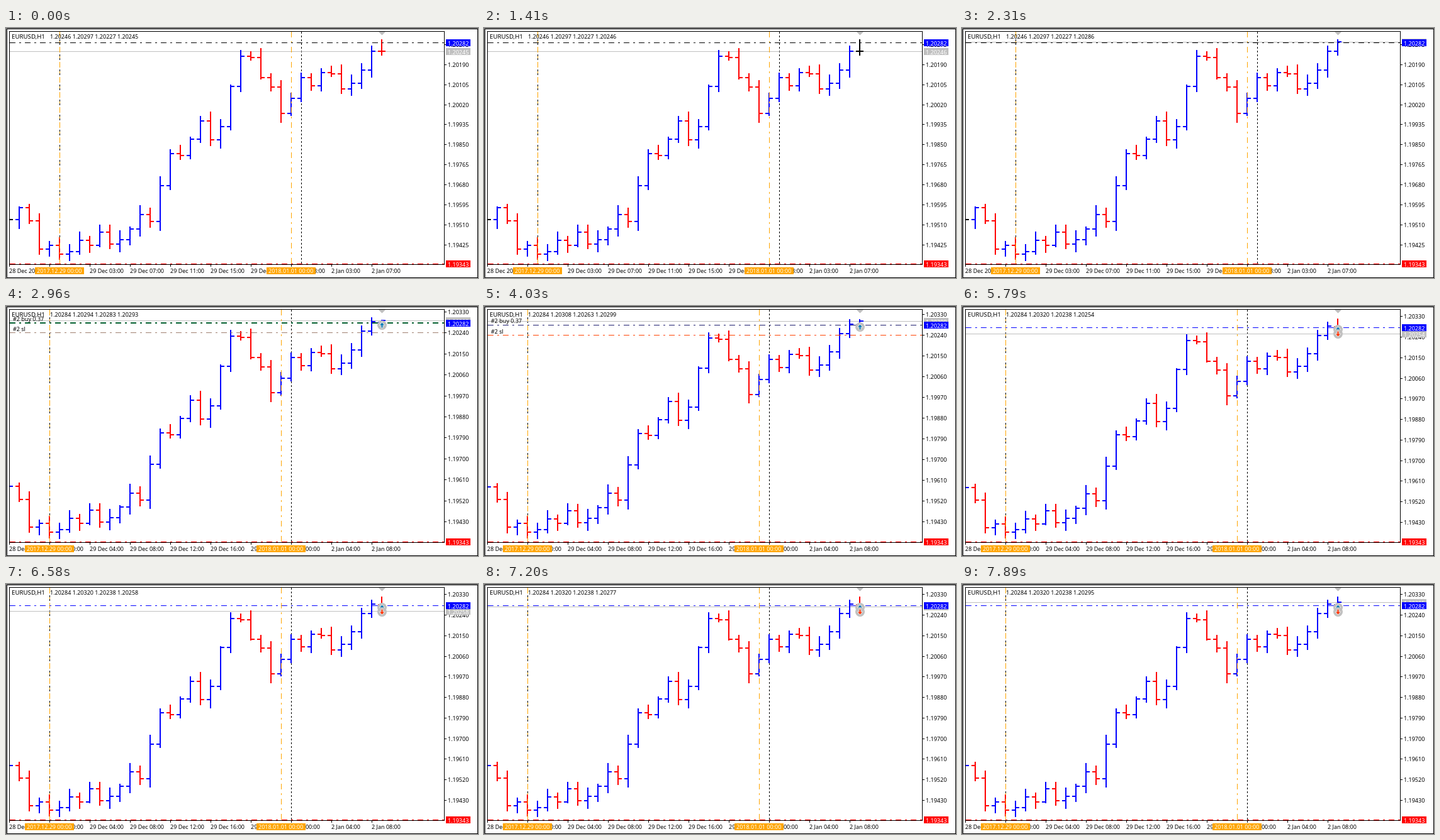
An HTML page with a canvas for the animation above (8000 ms loop, 750 px wide and 398 px high).

```html
<!DOCTYPE html>
<html>
<head>
<meta charset="utf-8">
<style>
html, body { margin: 0; width: 100%; height: 100%; overflow: hidden; background: #fff; }
canvas { display: block; }
</style>
</head>
<body>
<canvas id="stage" width="750" height="398"></canvas>
<script>
const ctx = document.getElementById('stage').getContext('2d');
const LOOP = 8000, TICK = 50, FIRST_TICK = 10;
const NEW_BAR = 2860, FILLED = 3060, STOPPED = 5460;
const LEFT = 5, RIGHT = 696, TOP = 5, BOTTOM = 376, STEP = 16, LAST_X = 597;
const FLOOR = 19343, ENTRY = 20282, STOP = 20240, SCALE = 0.3749;
const BLUE = '#00f', RED = '#f00', SILVER = '#c0c0c0', ORANGE = '#ffa500';
const DASH_DOT = [9, 6, 3, 6], DOTS = [3, 3];

// Closing levels of the finished bars, as chart rows at the opening scale
const closes = [
  305, 286, 307, 352, 346, 360, 356, 338, 346, 325, 344, 337, 320, 297, 308, 251, 200, 203, 177,
  148, 178, 157, 93, 45, 47, 79, 94, 136, 112, 79, 92, 71, 73, 97, 88, 67, 37
];
// Turning points of the live quote: ms, points above 1.20000
const turns = [
  [0, 245], [910, 245], [960, 243], [1410, 246], [2110, 272], [2610, 307], [2810, 287],
  [2860, 283], [2910, 294], [2960, 293], [3460, 263], [3960, 308], [4010, 299], [4460, 306],
  [4610, 320], [5560, 238], [5760, 254], [6510, 256], [7160, 277], [7360, 255], [7710, 299],
  [7860, 295]
];

let seed = 7;
const random = () => (seed = seed * 16807 % 2147483647) / 2147483647;
const wick = () => 2 + 14 * random();
const rowPrice = row => FLOOR + (375.5 - row) / SCALE;

const bars = closes.map((close, i) => {
  const open = i ? closes[i - 1] : close;
  const [up, down] = i ? [wick(), wick()] : [0, 0];
  return {
    open: rowPrice(open), close: rowPrice(close),
    high: rowPrice(Math.min(open, close) - up),
    low: rowPrice(Math.max(open, close) + down)
  };
});

function quote(time) {
  const next = turns.findIndex(([t]) => t > time);
  if (next < 0) return 20000 + turns[turns.length - 1][1];
  const [t0, p0] = turns[next - 1], [t1, p1] = turns[next];
  return 20000 + Math.round(p0 + (p1 - p0) * (time - t0) / (t1 - t0));
}

function runBar(bar, from, to) {
  bar.close = quote(from);
  for (let time = from; time <= to; time += TICK) {
    bar.close = quote(time);
    bar.high = Math.max(bar.high, bar.close);
    bar.low = Math.min(bar.low, bar.close);
  }
  return bar;
}
const firstBar = to => runBar({ open: 20246, high: 20297, low: 20227 }, FIRST_TICK, to);
const secondBar = to => runBar({ open: 20284, high: 20284, low: 20284 }, NEW_BAR, to);

const format = points => (points / 1e5 + 1 - Math.floor(points / 1e5)).toFixed(5);

function rect(color, x, y, w, h) {
  ctx.fillStyle = color;
  ctx.fillRect(x, y, w, h);
}
function text(string, x, y, color = '#000') {
  ctx.fillStyle = color;
  ctx.fillText(string, x, y + 3.5);
}
function line(color, x1, y1, x2, y2, dash = [], width = 1) {
  ctx.strokeStyle = color;
  ctx.lineWidth = width;
  ctx.setLineDash(dash);
  ctx.beginPath();
  ctx.moveTo(x1, y1);
  ctx.lineTo(x2, y2);
  ctx.stroke();
}
const across = (color, y, dash, width) => line(color, LEFT + 1, y, RIGHT, y, dash, width);
const down = (color, x, dash) => line(color, x + 0.5, TOP + 1, x + 0.5, BOTTOM, dash);

function priceTag(points, y, color) {
  rect(color, 699, Math.round(y - 5.5), 39, 11);
  text(format(points), 702, Math.round(y), '#fff');
}
function dateTag(string, center) {
  rect(ORANGE, center - 39, 381, 78, 11);
  text(string, center - 36, 386, '#fff');
}

function drawBar({ open, high, low, close }, x, yOf) {
  const color = close === open ? '#000' : close > open ? BLUE : RED;
  const top = Math.round(yOf(high)), bottom = Math.round(yOf(low));
  rect(color, x - 1, top, 2, bottom - top);
  rect(color, x - 6, Math.round(yOf(open)) - 1, 6, 2);
  rect(color, x, Math.round(yOf(close)) - 1, 6, 2);
}

function marker(y, color, direction) {
  ctx.save();
  ctx.translate(597.5, y);
  ctx.fillStyle = SILVER;
  ctx.beginPath();
  ctx.arc(0, 0, 7.5, 0, 7);
  ctx.fill();
  ctx.scale(1, direction);
  ctx.beginPath();
  [[0, -4], [3.5, 0], [1, 0], [1, 4], [-1, 4], [-1, 0], [-3.5, 0]].forEach(p => ctx.lineTo(...p));
  ctx.closePath();
  ctx.setLineDash([]);
  ctx.strokeStyle = '#eee';
  ctx.lineWidth = 1.5;
  ctx.stroke();
  ctx.fillStyle = color;
  ctx.fill();
  ctx.restore();
}

function drawAxes(second, yOf) {
  const top = second ? 20330 : 20275, gap = second ? 90 : 85;
  for (let i = 0; i <= 10; i++) {
    const price = top - gap * i, y = Math.round(yOf(price));
    rect('#000', RIGHT, y, 4, 1);
    text(format(price), 702, y);
  }
  for (let i = 0; i < 10; i++) {
    const x = LEFT + 64 * i, hour = 19 + 4 * i + second;
    const day = hour < 24 ? '28 Dec' : hour < 48 ? '29 Dec' : '2 Jan';
    rect('#000', x, BOTTOM, 1, 4);
    text(i ? `${day} ${String(hour % 24).padStart(2, '0')}:00` : '28 Dec 2017', x, 386);
  }
}

function draw(t) {
  const second = t >= NEW_BAR ? 1 : 0, shift = second * STEP;
  const zoom = second + (t >= 3960) + (t >= 4610);
  const yOf = price => 375.4 - (price - FLOOR) * (SCALE - 0.00373 * zoom);
  const lineY = price => Math.round(yOf(price)) + 0.5;
  const current = second ? secondBar(t) : firstBar(t);
  const holding = second && t < STOPPED;
  const bidY = lineY(current.close), entryY = lineY(ENTRY), stopY = lineY(STOP);

  rect('#fff', 0, 0, 750, 398);
  rect('#808080', 0, 0, 750, 1);
  rect('#808080', 0, 0, 1, 398);
  ctx.setLineDash([]);
  ctx.lineWidth = 1;
  ctx.strokeStyle = '#000';
  ctx.strokeRect(1.5, 1.5, 748, 396);
  ctx.strokeRect(LEFT + 0.5, TOP + 0.5, RIGHT - LEFT, BOTTOM - TOP);
  ctx.font = '9px "Noto Sans", "Open Sans", sans-serif';
  drawAxes(second, yOf);

  ctx.save();
  ctx.beginPath();
  ctx.rect(LEFT + 1, TOP + 1, RIGHT - LEFT - 1, BOTTOM - TOP - 1);
  ctx.clip();
  for (const x of [85, 469]) down('#000', x - shift, DOTS);
  across(SILVER, bidY);

  bars.forEach((bar, i) => drawBar(bar, LEFT + STEP * i - shift, yOf));
  if (second) drawBar(firstBar(NEW_BAR - TICK), LAST_X - STEP, yOf);
  drawBar(current, LAST_X, yOf);

  for (const x of [85, 453]) down(ORANGE, x - shift, DASH_DOT);
  across(RED, 375.5, DASH_DOT);
  if (second && t < FILLED) across('#006030', entryY - 0.5, DASH_DOT, 2);
  else across(!second ? '#000' : holding ? '#202070' : BLUE, entryY, DASH_DOT);
  if (holding) {
    across(t < FILLED ? '#a08070' : '#ff4500', stopY, DASH_DOT);
    text('#2 buy 0.37', 11, entryY - 7);
    text('#2 sl', 11, stopY - 6);
  }
  ctx.fillStyle = SILVER;
  ctx.beginPath();
  ctx.moveTo(592, 6);
  ctx.lineTo(603, 6);
  ctx.lineTo(597.5, 11.5);
  ctx.fill();
  if (second) marker(entryY + 3, '#0078b4', 1);
  if (t >= STOPPED) marker(44.5, '#ff3000', -1);
  ctx.restore();

  priceTag(current.close, bidY, SILVER);
  priceTag(ENTRY, entryY, BLUE);
  priceTag(FLOOR, 375.5, RED);
  dateTag('2017.12.29 00:00', 85 - shift);
  dateTag('2018.01.01 00:00', 453 - shift);

  const { open, high, low, close } = current;
  text([open, high, low, close].map(format).join(' '), 70, 13);
  ctx.font = '9.7px "Noto Sans", "Open Sans", sans-serif';
  text('EURUSD,H1', 9, 13);
}

function frame() {
  draw(performance.now() % LOOP);
  requestAnimationFrame(frame);
}
frame();
</script>
</body>
</html>
```
